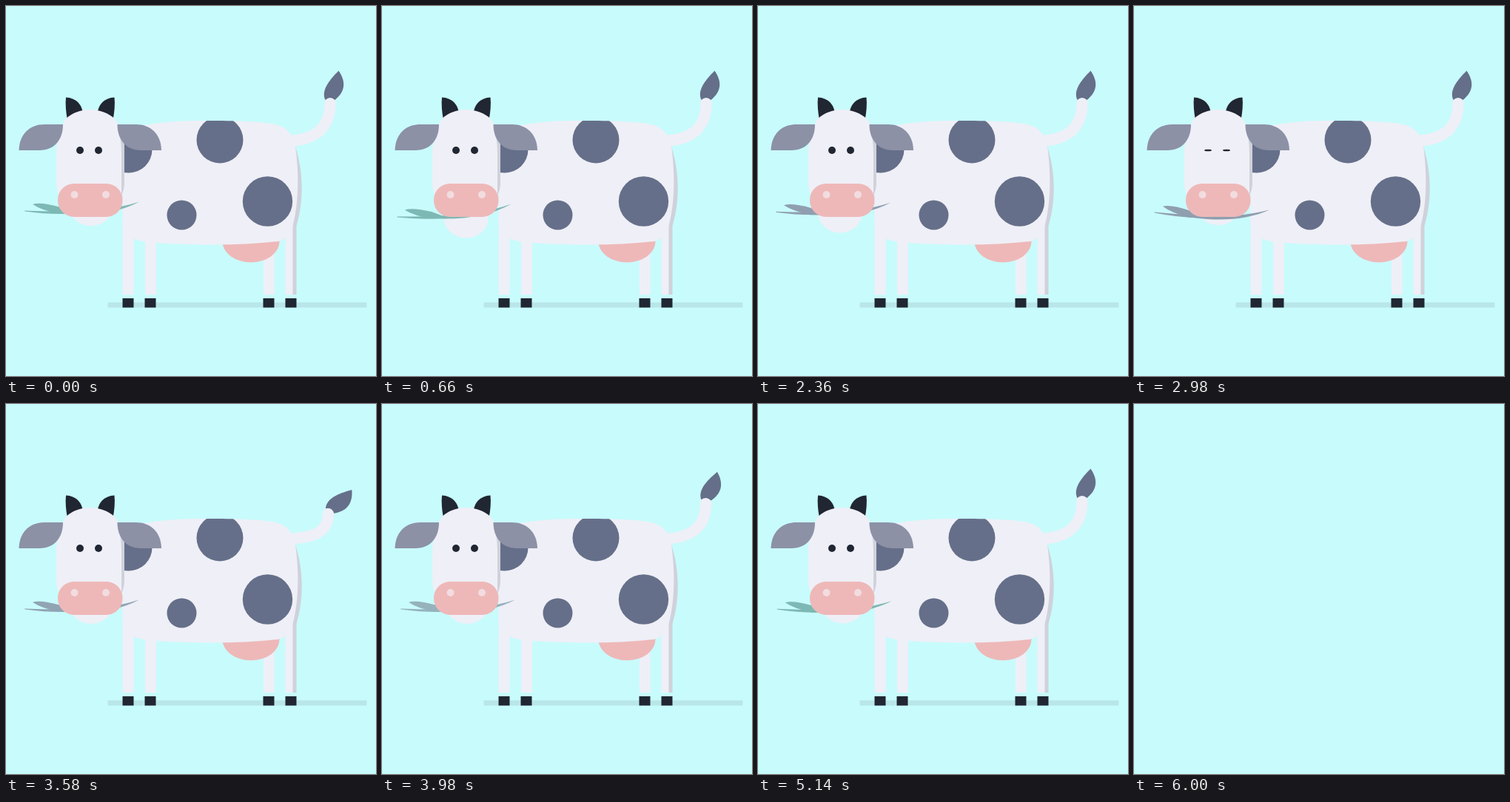
Recreate the animation shown at these times as an HTML page. Size 500 px wide and 500 px high, loop 6.02 s.

```html
<!DOCTYPE html>
<html lang="en">
<head>
<meta charset="utf-8">
<title>Chewing cow</title>
<style>
  html, body { margin: 0; width: 100%; height: 100%; overflow: hidden; background: #c8fbfc; }
  svg { display: block; width: 100vw; height: 100vh; }
  .hide { fill: #efeff7; }
  .spot { fill: #656f89; }
  .dark { fill: #202632; }
  .ear { fill: #8c91a6; }
  .pink { fill: #eeb8b8; }
  .shade { fill: #cfd1db; }
  .nostril { fill: #f2dce0; }
</style>
</head>
<body>
<svg viewBox="0 0 500 500">
  <defs>
    <path id="torso" d="M157 170 C190 157 230 155 270 155 C310 155 345 156 364 160 C380 164 388 174 391 189 C396 225 396 265 387.500 297 L377 313 Q374 317 368 318 C340 321 310 322.500 280 322.500 C240 322.500 205 321 185 318 Q172 316 168 309 L157.500 293 Z"/>
    <clipPath id="inTorso"><use href="#torso"/></clipPath>
    <path id="horn" d="M81 123.500 C94 124 104 133 104 148 L83 154 C81 144 80 133 81 123.500Z"/>
    <path id="earShape" d="M17.500 195 C18 173 32 160 52 160 H77 C77 180 66 195 45 195Z"/>
  </defs>

  <g id="cow">
    <rect x="137.500" y="400.500" width="350" height="7" fill="#b9e7e9"/>

    <path id="tail" fill="none" stroke="#efeff7" stroke-width="15" stroke-linecap="round"/>
    <path id="tuft" class="spot" d="M11.500 -43.500 C-3 -29 -12 -16 -6.500 -4 Q0 -10 6.500 -4 C19 -14 23 -27 11.500 -43.500Z"/>

    <path class="shade" d="M390 187 C402 222 403 262 392.500 297 V390 H387 V297 Z"/>
    <rect class="hide" x="348" y="300" width="14.500" height="90"/>
    <rect class="hide" x="377.500" y="290" width="10" height="100"/>
    <rect class="hide" x="157.500" y="285" width="15" height="105"/>
    <rect class="hide" x="188" y="300" width="15" height="90"/>
    <g class="dark">
      <rect x="157.500" y="395" width="15" height="12.500"/>
      <rect x="187.500" y="395" width="15" height="12.500"/>
      <rect x="347.500" y="395" width="15" height="12.500"/>
      <rect x="377.500" y="395" width="15" height="12.500"/>
    </g>
    <ellipse class="pink" cx="331" cy="318" rx="38.500" ry="28.500"/>
    <use href="#torso" class="hide"/>
    <g class="spot" clip-path="url(#inTorso)">
      <circle cx="289" cy="181" r="31.500"/>
      <circle cx="166" cy="194" r="31.500"/>
      <circle cx="353.500" cy="264" r="33.700"/>
      <circle cx="237.500" cy="282.500" r="20"/>
    </g>

    <g class="dark">
      <use href="#horn"/>
      <use href="#horn" transform="matrix(-1 0 0 1 227.500 0)"/>
    </g>
    <path class="shade" d="M150 165 H160 V238 Q160 248 156 256 H150Z"/>
    <path class="hide" d="M68 200 C68 180 75 171 77 160 C80 148 98 140 113.500 140 C129 140 148 148 151 160 C153 171 156 180 156 200 V258 H74 Q68 251 68 240Z"/>
    <g class="ear">
      <use href="#earShape"/>
      <use href="#earShape" transform="matrix(-1 0 0 1 227.500 0)"/>
    </g>
    <g class="dark">
      <ellipse class="eye" cx="100" cy="195" rx="5" ry="5"/>
      <ellipse class="eye" cx="125" cy="195" rx="5" ry="5"/>
    </g>

    <ellipse id="jaw" class="hide" cx="115" cy="270" rx="30" ry="27"/>
    <g id="grass">
      <path d="M25.500 277.500 Q55 281.500 80 281 C120 284 155 278 180 264.500 Q160 271 135 274.500 Q90 279 25 276.500Z"/>
      <path d="M36 268 Q46 264.500 72 271.500 L95 281 H72 Q48 276 36 268Z"/>
    </g>
    <rect class="pink" x="70" y="240" width="87.500" height="45" rx="22"/>
    <circle class="nostril" cx="92.500" cy="255" r="5"/>
    <circle class="nostril" cx="135" cy="255" r="5"/>
  </g>
</svg>

<script>
const LOOP = 6020, CUT = 6000, CHEW = 2000;
const $ = id => document.getElementById(id);
const cow = $('cow'), jaw = $('jaw'), grass = $('grass'), tail = $('tail'), tuft = $('tuft');
const eyes = document.querySelectorAll('.eye');

// time, jaw x, jaw y, grass x, grass y, grass angle
const chewKeys = [
  [0, 0, 0, 0, 0, 0],
  [360, -4, 9.5, -1, 1.2, 0],
  [680, -1.3, 16.2, -5, 5.7, -1.8],
  [980, -1, -0.8, 2.5, 6.5, 3.3],
  [1200, 0, 0, 0, 0, 0]
];
// time, r, g, b
const grassTint = [
  [1960, 126, 184, 180],
  [2360, 143, 159, 176],
  [3420, 143, 159, 176],
  [3980, 150, 178, 188],
  [4500, 126, 184, 180]
];

const clamp = x => Math.min(1, Math.max(0, x));
const ease = x => (1 - Math.cos(Math.PI * clamp(x))) / 2;

function segment(keys, t) {
  let i = 0;
  while (i < keys.length - 2 && t >= keys[i + 1][0]) i++;
  return [i, clamp((t - keys[i][0]) / (keys[i + 1][0] - keys[i][0]))];
}

function linear(keys, t) {
  const [i, u] = segment(keys, t);
  return keys[i].slice(1).map((v, c) => v + (keys[i + 1][c + 1] - v) * u);
}

// smooth curve through the keys, at rest on both ends
function spline(keys, t) {
  const [i, u] = segment(keys, t);
  const a = keys[i], b = keys[i + 1], span = b[0] - a[0];
  const slope = (k, c) => k === 0 || k === keys.length - 1 ? 0
    : (keys[k + 1][c] - keys[k - 1][c]) / (keys[k + 1][0] - keys[k - 1][0]);
  return a.slice(1).map((v, n) => {
    const c = n + 1, u2 = u * u, u3 = u2 * u;
    return v * (2 * u3 - 3 * u2 + 1) + b[c] * (3 * u2 - 2 * u3)
      + span * (slope(i, c) * (u3 - 2 * u2 + u) + slope(i + 1, c) * (u3 - u2));
  });
}

function drawTail(t) {
  const bend = t < 3720 ? ease((t - 3400) / 320) : 1 - ease((t - 3720) / 330);
  const x = 438 - 4 * bend, y = 131 + 28 * bend;
  tail.setAttribute('d', `M385 182 C${420 - 4 * bend} 180 ${x} ${163 + 16 * bend} ${x} ${y}`);
  tuft.setAttribute('transform', `translate(${x} ${y}) rotate(${50 * bend})`);
}

function draw(t) {
  cow.style.display = t < CUT ? '' : 'none';
  const [jx, jy, gx, gy, angle] = spline(chewKeys, t % CHEW);
  jaw.setAttribute('transform', `translate(${jx} ${jy})`);
  grass.setAttribute('transform', `translate(${gx} ${gy}) rotate(${angle} 103 272)`);
  grass.setAttribute('fill', `rgb(${linear(grassTint, t).map(Math.round)})`);
  const lid = 1 - 0.9 * clamp(1 - Math.abs(t - 3000) / 100);
  eyes.forEach(eye => eye.setAttribute('ry', 5 * lid));
  drawTail(t);
}

const start = performance.now();
function tick() {
  draw((performance.now() - start) % LOOP);
  requestAnimationFrame(tick);
}
tick();
</script>
</body>
</html>
```
